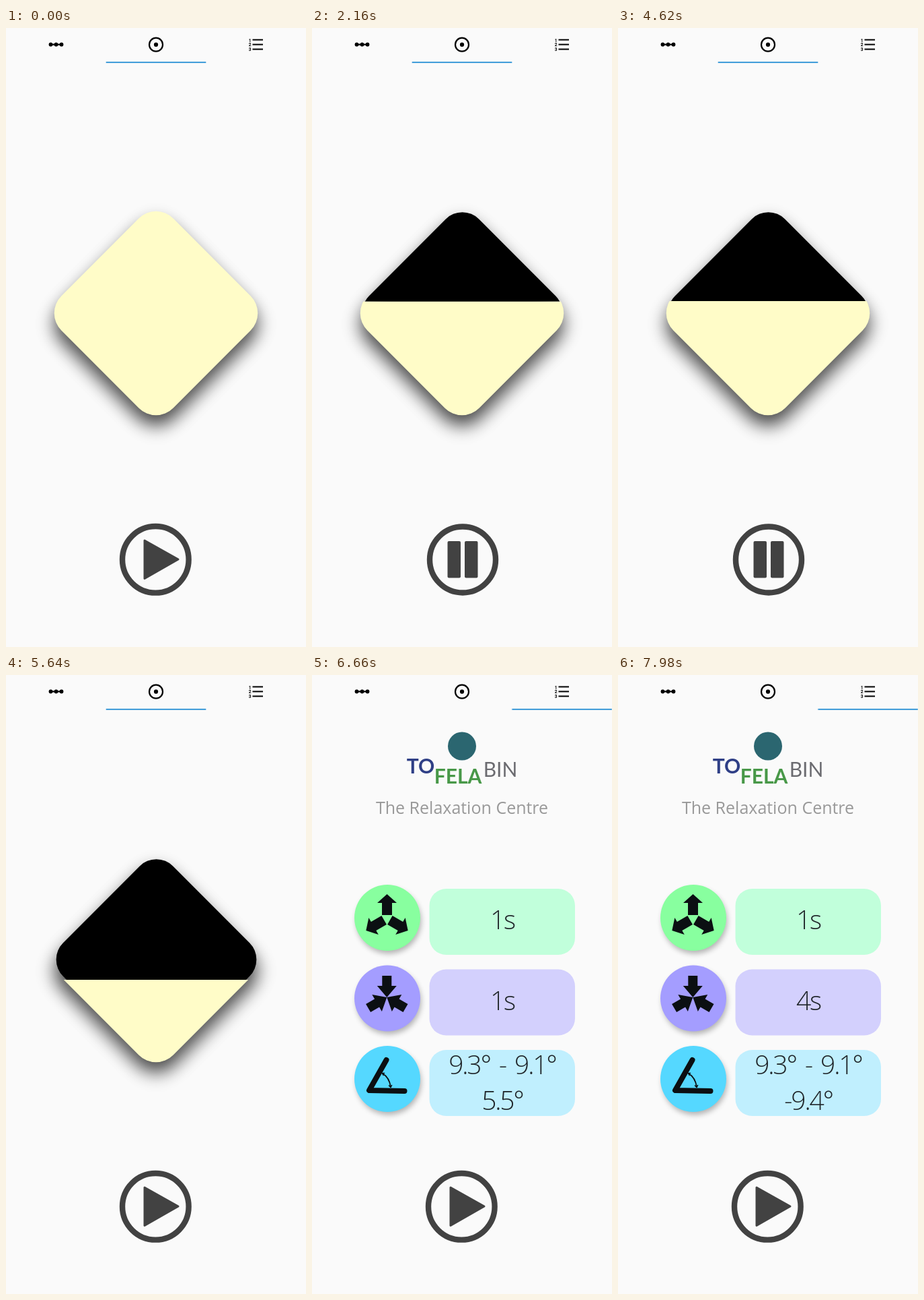
Write an HTML page that moves like this. It is 446x918 px and loops after 8000 ms.

```html
<!DOCTYPE html>
<html lang="en">
<head>
<meta charset="utf-8">
<title>Breathing trainer</title>
<style>
html, body { margin: 0; width: 100%; height: 100%; overflow: hidden; background: #fafafa; }
svg { display: block; width: 446px; height: 918px; }
text { text-anchor: middle; }
.pages, .tab, .level, .idle, .running { animation: 8s linear infinite; }

.pages { animation-name: swipe; }
.tab { animation-name: tab; }
@keyframes swipe {
  0%, 73.5% { transform: translateX(0); animation-timing-function: cubic-bezier(.5, .2, .8, .8); }
  77.25% { transform: translateX(-259.5px); animation-timing-function: cubic-bezier(.3, .5, .6, 1); }
  81.75%, 100% { transform: translateX(-446px); }
}
@keyframes tab {
  0%, 73.5% { transform: translateX(0); animation-timing-function: cubic-bezier(.5, .2, .8, .8); }
  77.25% { transform: translateX(86.5px); animation-timing-function: cubic-bezier(.3, .5, .6, 1); }
  81.75%, 100% { transform: translateX(148.6px); }
}

/* Height of the border between black and yellow */
.level { animation-name: breathe; animation-timing-function: ease-in-out; }
@keyframes breathe {
  0% { transform: translateY(260px); animation-timing-function: step-end; }
  14.25% { transform: translateY(422px); }
  27% { transform: translateY(405.5px); }
  42% { transform: translateY(429.5px); }
  57.75% { transform: translateY(405px); }
  67.5%, 100% { transform: translateY(452px); }
}

.idle { animation-name: idle; animation-timing-function: step-end; }
.running { animation-name: running; animation-timing-function: step-end; }
@keyframes idle { 0%, 67.5%, 100% { opacity: 1; } 14.25% { opacity: 0; } }
@keyframes running { 0%, 67.5%, 100% { opacity: 0; } 14.25% { opacity: 1; } }

.value { font: 300 39px "Open Sans", "Noto Sans", sans-serif; letter-spacing: -2.2px; word-spacing: 5px; fill: #20262a; }
.brand { font: 700 30px Lato, sans-serif; }
.tagline { font: 25px "Open Sans", "Noto Sans", sans-serif; fill: #999; }
.digits { font: 700 6.5px Roboto, sans-serif; }
.ink { fill: #0b0f12; }
.dark { fill: #424242; }
.ring { fill: none; stroke: #424242; stroke-width: 8.4; }
</style>
</head>
<body>
<svg viewBox="0 0 446 918">
  <defs>
    <filter id="deep" x="-30%" y="-30%" width="160%" height="160%"><feGaussianBlur stdDeviation="13"/></filter>
    <filter id="soft" x="-30%" y="-30%" width="160%" height="160%"><feGaussianBlur stdDeviation="4"/></filter>
    <clipPath id="above"><rect class="level" y="-918" width="446" height="918"/></clipPath>
    <clipPath id="below"><rect class="level" width="446" height="918"/></clipPath>
    <path id="out" d="M0-36 14.5-23H7.5V-5H-7.5V-23H-14.5Z"/>
    <path id="in" d="M0 0 14.5-17H7V-32H-7V-17H-14.5Z"/>
    <g id="play">
      <circle class="ring" cx="222.3" cy="788.3" r="49.3"/>
      <path class="dark" d="M206 760 256 788 206 816.5Z" stroke="#424242" stroke-width="3" stroke-linejoin="round"/>
    </g>
  </defs>

  <g class="pages">
    <rect x="105.5" y="305.5" width="235" height="235" rx="36" transform="translate(0 16) rotate(45 223 423)" opacity=".7" filter="url(#deep)"/>
    <g clip-path="url(#below)">
      <rect x="105.5" y="305.5" width="235" height="235" rx="36" transform="rotate(45 223 423)" fill="#fffcc8"/>
    </g>
    <g clip-path="url(#above)">
      <rect x="108" y="306.5" width="231" height="231" rx="35" transform="rotate(45 223.5 422)"/>
    </g>
    <use href="#play" class="idle"/>
    <g class="running">
      <circle class="ring" cx="224" cy="788.5" r="49"/>
      <rect class="dark" x="201.5" y="761" width="19.5" height="54.5" rx="2"/>
      <rect class="dark" x="227" y="761" width="19.5" height="54.5" rx="2"/>
    </g>

    <g transform="translate(446 0)">
      <circle cx="223" cy="105.5" r="21" fill="#2b6670"/>
      <g class="brand">
        <text x="161.5" y="146" fill="#2f3f86">TO</text>
        <text x="217" y="161" fill="#489848">FELA</text>
        <text x="280" y="151" fill="#6b6b70" font-weight="400">BIN</text>
      </g>
      <text class="tagline" x="223" y="205.5">The Relaxation Centre</text>
      <g id="rows"></g>
      <g class="ink">
        <g transform="translate(111.5 361)">
          <use href="#out"/><use href="#out" transform="rotate(120)"/><use href="#out" transform="rotate(240)"/>
        </g>
        <g transform="translate(111.3 478)">
          <use href="#in"/><use href="#in" transform="rotate(120)"/><use href="#in" transform="rotate(240)"/>
        </g>
        <g fill="none" stroke="#0b0f12" stroke-linecap="round" stroke-linejoin="round">
          <path d="M110.5 571 85 616 137.5 617" stroke-width="8"/>
          <path d="M105 591Q115 597 117 611" stroke-width="1.8"/>
          <path d="M107.5 590.5H104.5L106 593.5M114.5 609 117 611.5 118.5 608.5" stroke-width="1.6"/>
        </g>
      </g>
      <g id="values"></g>
      <use href="#play"/>
    </g>
  </g>

  <g>
    <path d="M66 24.5H83" stroke="#000" stroke-width="2.2"/>
    <circle cx="66.5" cy="24.5" r="2.9"/><circle cx="74.5" cy="24.5" r="2.9"/><circle cx="82.5" cy="24.5" r="2.9"/>
    <circle cx="223" cy="24.7" r="10" fill="none" stroke="#000" stroke-width="2.2"/>
    <circle cx="223" cy="24.7" r="3.1"/>
    <path d="M366.5 17.5H382M366.5 24.5H382M366.5 31.5H382" stroke="#000" stroke-width="2.2"/>
    <g class="digits"><text x="362.5" y="20.5">1</text><text x="362.5" y="27">2</text><text x="362.5" y="33.5">3</text></g>
    <rect class="tab" x="148.7" y="49.9" width="148.6" height="2.1" fill="#459fda"/>
  </g>
</svg>
<script>
const LOOP = 8000;

function add(parent, tag, attrs) {
  const el = document.createElementNS('http://www.w3.org/2000/svg', tag);
  for (const [key, value] of Object.entries(attrs)) el.setAttribute(key, value);
  return document.getElementById(parent).appendChild(el);
}

[['#88ff9f', '#c1ffdb'], ['#a49dff', '#d3d0fd'], ['#55d8ff', '#c0effe']].forEach(([knob, box], i) => {
  const cy = 360 + i * 119.5;
  add('rows', 'circle', { cx: 114, cy: cy + 5, r: 48, opacity: .3, filter: 'url(#soft)' });
  add('rows', 'circle', { cx: 112, cy, r: 49, fill: knob });
  add('rows', 'rect', { x: 174.5, y: cy - 43, width: 216.5, height: 98, rx: 25, fill: box });
});

// Each step is [start in ms, text]; a text stays until the next one starts.
function readout(y, steps) {
  steps.forEach(([start, label], i) => {
    const end = steps[i + 1]?.[0] ?? LOOP;
    const el = add('values', 'text', { class: 'value', x: 283, y });
    el.textContent = label;
    if (steps.length === 1) return;
    const frames = [[0, 0], [start / LOOP, 1], [end / LOOP, 0], [1, 0]];
    el.animate(frames.map(([offset, opacity]) => ({ offset, opacity, easing: 'step-end' })),
      { duration: LOOP, iterations: Infinity });
  });
}

readout(377, [[0, '1s']]);
readout(496.5, [[0, '1s'], [7080, '2s'], [7380, '3s'], [7680, '4s']]);
readout(592, [[0, '5.1° - 10.1°'], [6420, '9.3° - 9.1°']]);
readout(644.5, [[0, '9.7°'], [6420, '5.5°'], [6840, '2.1°'], [7080, '-1.6°'],
  [7320, '-5.2°'], [7560, '-8.3°'], [7800, '-9.4°']]);
</script>
</body>
</html>
```
